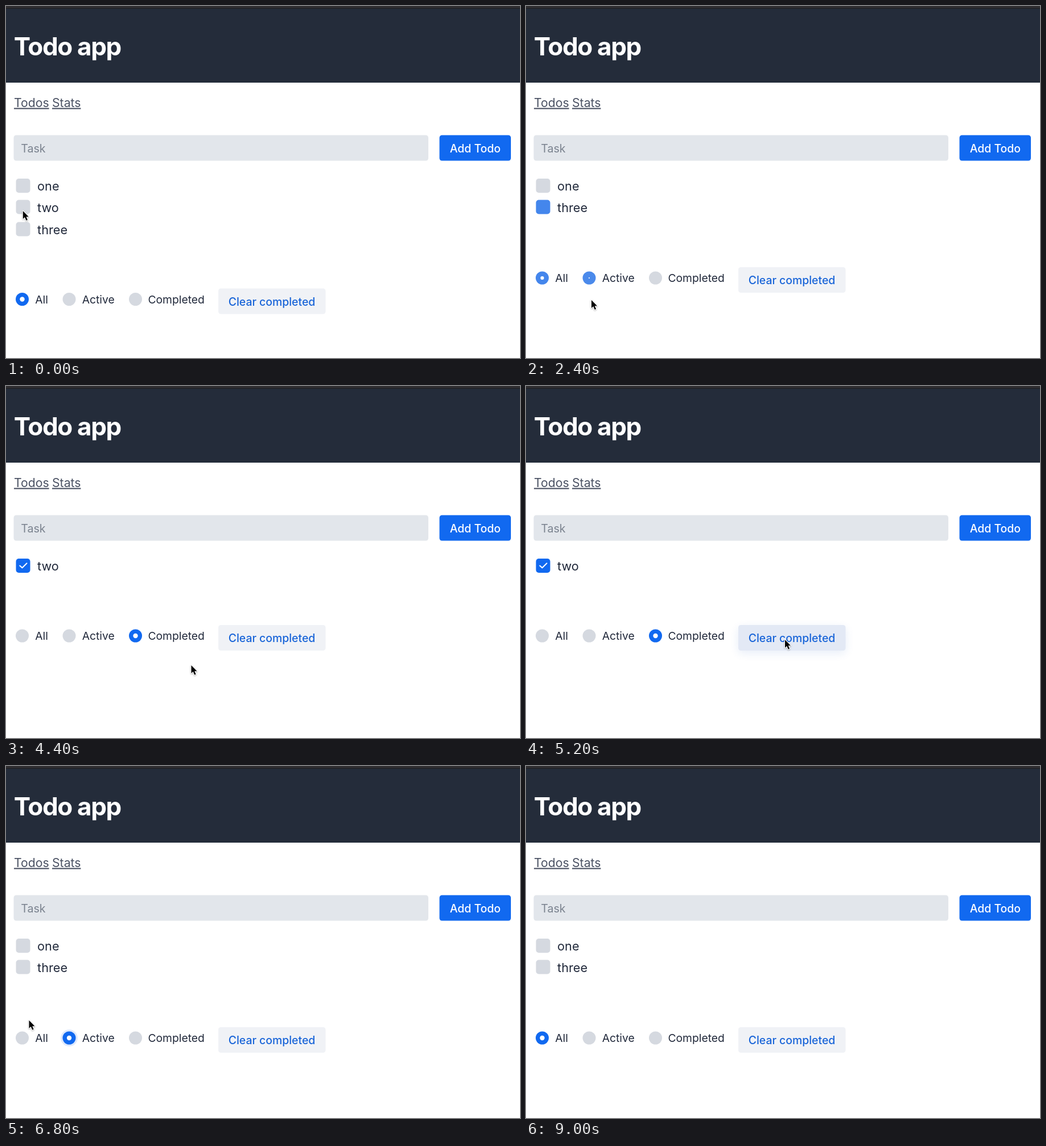
An HTML page that plays this animation: 903x620 px, repeating every 9.9 s.

```html
<!DOCTYPE html>
<html lang="en">
<head>
<meta charset="utf-8">
<title>Todo app</title>
<style>
  html, body { margin: 0; width: 100%; height: 100%; overflow: hidden; background: #fff; }
  svg { display: block; width: 903px; height: 620px; }
  text { font-family: Inter, "Noto Sans", sans-serif; font-optical-sizing: none; fill: #20283a; white-space: pre; }
  .title { font-size: 44px; font-weight: 700; letter-spacing: -1.35px; fill: #fff; }
  .link { font-size: 21.2px; fill: #4a5163; text-decoration: underline; text-decoration-thickness: 1.4px; text-underline-offset: 2.5px; }
  .hint { font-size: 19.6px; fill: #7b838f; }
  .button { font-size: 19.4px; font-weight: 500; text-anchor: middle; }
  .task { font-size: 21.7px; }
  .label { font-size: 19.3px; }
  #cursor { filter: drop-shadow(0 1.5px 1.2px rgba(0, 0, 0, .3)); }
</style>
</head>
<body>
<svg id="stage" viewBox="0 0 903 620">
  <defs>
    <filter id="soft" x="-20%" y="-80%" width="140%" height="260%"><feGaussianBlur stdDeviation="8"/></filter>
  </defs>
  <rect width="903" height="620" fill="#fff"/>
  <rect width="903" height="135" fill="#242c3a"/>
  <rect width="903" height="4" fill="#2e2d30"/>
  <rect y="4" width="903" height="1" fill="#1c1e22"/>
  <text class="title" x="13.7" y="87">Todo app</text>
  <text class="link" x="14" y="177.5">Todos</text>
  <text class="link" x="81" y="177.5">Stats</text>
  <rect x="13.5" y="227.5" width="728.5" height="45" rx="4.5" fill="#e2e6eb"/>
  <text class="hint" x="26.3" y="257.5">Task</text>
  <rect x="761.5" y="227.5" width="125.5" height="45" rx="4.5" fill="#1169f0"/>
  <text class="button" x="824.3" y="257.5" style="fill:#fff">Add Todo</text>
  <g id="rows"></g>
  <g id="footer">
    <rect id="glow" x="373" y="502" width="188.5" height="45" rx="5" fill="#1f57c0" filter="url(#soft)"/>
    <rect id="clear" x="373" y="497.5" width="188.5" height="45" rx="4.5"/>
    <text class="button" x="467" y="527.5" style="fill:#1864d8">Clear completed</text>
  </g>
  <path id="cursor" d="M0 0V14L3.2 11L5.7 16.8L8.1 15.8L5.7 10.2H10Z" fill="#000" stroke="#fff" stroke-width="2.2" stroke-linejoin="round" paint-order="stroke"/>
</svg>
<script>
const LOOP = 9900, STEP = 100;
const GREY = [213, 217, 224], BLUE = [17, 105, 240];
const PALE = [240, 242, 246], HOVER = [227, 233, 245];
const ROW_SHIFT = [0, 37.5, 76.5];
const FOOTER_SHIFT = [-115, -76.5, -37.5, 0];

// Click times
const CHECK = 900, ACTIVE = 2300, DONE = 3700, CLEAR = 5300, ACTIVE2 = 6500, ALL = 7300, LEAVE = 8000;

const $ = id => document.getElementById(id);
const clamp = v => Math.min(1, Math.max(0, v));
const smooth = v => v * v * (3 - 2 * v);
const ramp = (t, from, length = 300) => clamp((t - from) / length);
const fillOn = p => 1 - (1 - p) ** 3;
const mix = (a, b, k) => `rgb(${a.map((v, i) => Math.round(v + (b[i] - v) * k))})`;

function add(parent, name, attrs, text) {
  const el = document.createElementNS("http://www.w3.org/2000/svg", name);
  set(el, attrs);
  if (text) el.textContent = text;
  return parent.appendChild(el);
}
function set(el, attrs) {
  for (const key in attrs) el.setAttribute(key, attrs[key]);
}

const rows = ROW_SHIFT.map(y => {
  const g = add($("rows"), "g", { transform: `translate(17.5 ${304 + y})` });
  return {
    g,
    ring: add(g, "rect", { x: -4.5, y: -4.5, width: 34, height: 34, rx: 8, fill: "#dfe9fc" }),
    box: add(g, "rect", { width: 25, height: 25, rx: 5 }),
    tick: add(g, "path", { d: "M6.8 12.5L11 16.3L19 8.3", fill: "none", stroke: "#fff", "stroke-width": 2, "stroke-linecap": "round", "stroke-linejoin": "round" }),
    text: add(g, "text", { class: "task", x: 37.6, y: 21 })
  };
});

const radios = [["All", 28.5, 51.3], ["Active", 111, 133.7], ["Completed", 227.5, 249.4]].map(([name, cx, x]) => {
  const at = { cx, cy: 516.5 };
  const radio = {
    ring: add($("footer"), "circle", { ...at, r: 14.8, fill: "#dfe9fc" }),
    disc: add($("footer"), "circle", { ...at, r: 11.5 }),
    dot: add($("footer"), "circle", { ...at, fill: "#fff" })
  };
  add($("footer"), "text", { class: "label", x, y: 523.7 }, name);
  return radio;
});

// Pointer stops: time, x, y
const PATH = [
  [0, 29.8, 361], [100, 30, 359.5], [500, 30, 359.5], [700, 37, 357], [900, 37, 357],
  [1000, 37, 355], [1400, 37, 355], [1800, 138, 484], [2100, 115, 518], [2400, 115, 518],
  [2900, 116, 520], [3600, 224, 482], [4100, 224, 482], [4400, 325.5, 492], [4800, 455, 447],
  [5400, 455, 447], [5800, 216.5, 503], [6100, 150, 470], [6400, 110, 406], [6500, 110, 406],
  [6800, 40.5, 448], [7100, 29, 476], [7500, 29, 476], [7900, 32, 494], [LOOP, 32, 494]
];
function pointer(t) {
  const i = PATH.findIndex(p => p[0] > t);
  const [t0, x0, y0] = PATH[i - 1], [t1, x1, y1] = PATH[i];
  const k = smooth((t - t0) / (t1 - t0));
  return [x0 + (x1 - x0) * k, y0 + (y1 - y0) * k];
}

function visibleTasks(t) {
  if (t < ACTIVE) return ["one", "two", "three"];
  if (t < DONE) return ["one", "three"];
  if (t < CLEAR) return ["two"];
  return t < ACTIVE2 ? [] : ["one", "three"];
}

const PICKS = [[-LOOP, 0], [ACTIVE, 1], [DONE, 2], [ACTIVE2, 1], [ALL, 0]];
function drawRadios(t) {
  const i = PICKS.filter(p => p[0] <= t).length - 1;
  const [since, now] = PICKS[i];
  const before = i ? PICKS[i - 1][1] : -1;
  const p = ramp(t, since);
  const rings = [
    ramp(t, ALL, 200) * (1 - ramp(t, 7600)),
    t < ALL ? ramp(t, ACTIVE2, 200) : 0,
    0
  ];
  radios.forEach(({ ring, disc, dot }, n) => {
    const blue = n === now ? fillOn(p) : n === before ? 1 - smooth(p) : 0;
    const size = n === now ? smooth(p) : blue;
    set(disc, { fill: mix(GREY, BLUE, blue) });
    set(dot, { r: 4.2 * size });
    set(ring, { opacity: rings[n] });
  });
}

function drawRows(t, tasks) {
  const first = t >= DONE && t < CLEAR ? ramp(t, DONE) : 0;
  const second = t < ACTIVE ? ramp(t, CHECK) : 0;
  const fading = t >= ACTIVE && t < DONE ? 1 - smooth(ramp(t, ACTIVE)) : 0;
  const blue = [fillOn(first), fillOn(second) + fading, 0];
  const tick = [first, second, 0];
  rows.forEach((row, n) => {
    set(row.g, { visibility: n < tasks.length ? "visible" : "hidden" });
    row.text.textContent = tasks[n] || "";
    set(row.box, { fill: mix(GREY, BLUE, blue[n]) });
    set(row.tick, { opacity: tick[n] });
    set(row.ring, { opacity: n === 1 && t < ACTIVE ? ramp(t, CHECK, 200) * (1 - ramp(t, 1600)) : 0 });
  });
}

function draw(t) {
  const tasks = visibleTasks(t);
  drawRows(t, tasks);
  drawRadios(t);
  set($("footer"), { transform: `translate(0 ${FOOTER_SHIFT[tasks.length]})` });

  const hover = ramp(t, 4700) * (1 - ramp(t, 5500, 600));
  set($("clear"), { fill: mix(PALE, HOVER, hover) });
  set($("glow"), { opacity: 0.1 * hover });

  set($("cursor"), {
    transform: `translate(${pointer(t)})`,
    visibility: t < LEAVE ? "visible" : "hidden"
  });
}

const start = performance.now();
function tick() {
  const t = (performance.now() - start) % LOOP;
  draw(Math.floor(t / STEP) * STEP);
  requestAnimationFrame(tick);
}
tick();
</script>
</body>
</html>
```
